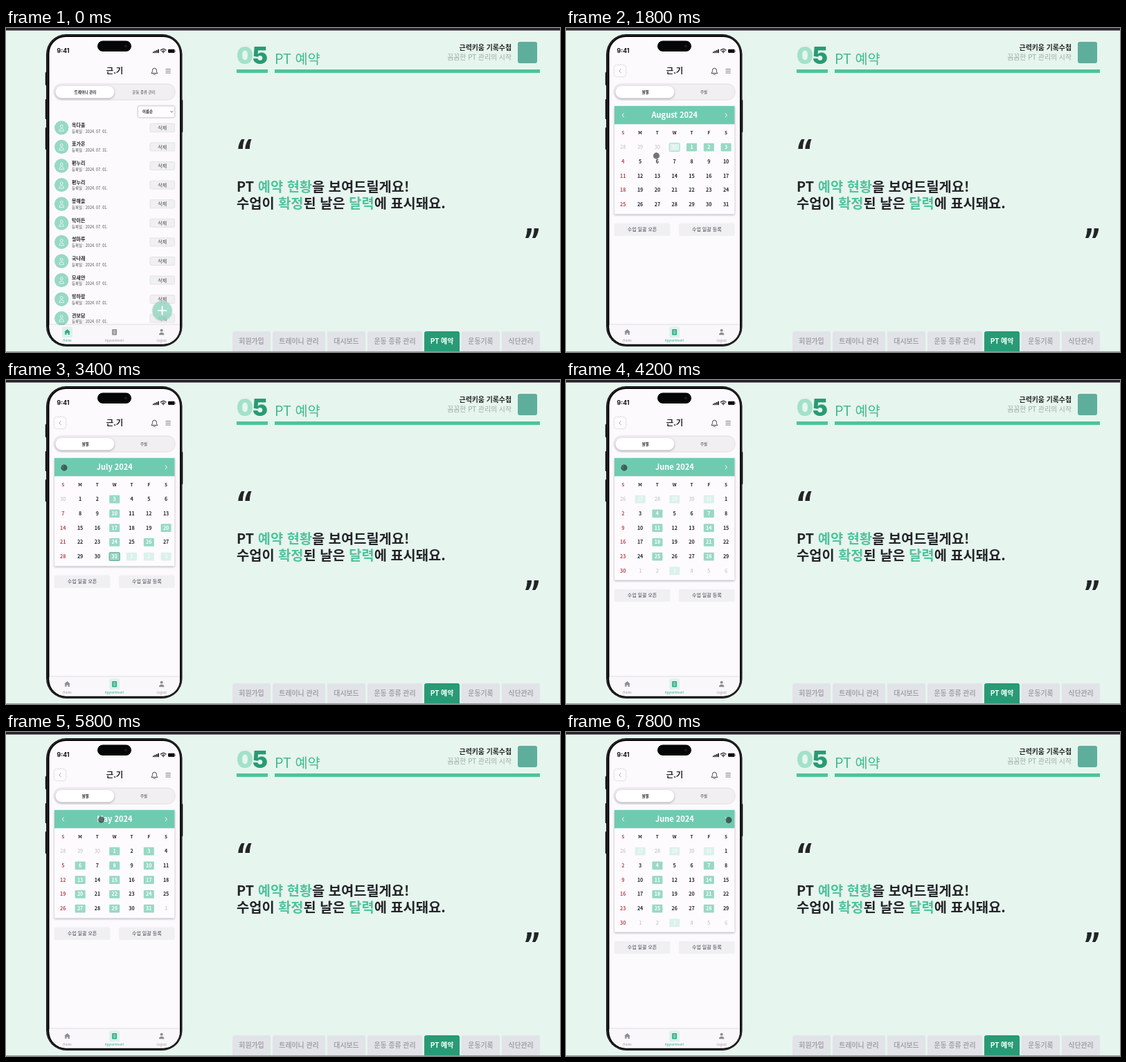
An HTML page for the animation above (8 s loop, 800 by 469 pixels).

```html
<!DOCTYPE html>
<html lang="ko">
<head>
<meta charset="utf-8">
<title>PT 예약</title>
<style>
  html, body { margin: 0; width: 100%; height: 100%; overflow: hidden; background: #e6f5ee; }
  svg { display: block; width: 100vw; height: 100vh; }
  text { font-family: "Noto Sans CJK KR", "Noto Sans CJK", "Noto Sans", sans-serif; white-space: pre; }
  .inter { font-family: Inter, sans-serif; }
  .soft { filter: drop-shadow(0 .5px 1px rgba(40, 40, 50, .3)); }
  .lift { filter: drop-shadow(0 1.5px 1.5px rgba(40, 40, 50, .38)); }
</style>
</head>
<body>
<svg id="stage" viewBox="0 0 800 469" preserveAspectRatio="none"></svg>
<script>
const LOOP = 8000, TICK = 200;
const GREEN = '#4fc39c', DEEP = '#289b75', MINT = '#98d9c4', INK = '#242428', RED = '#b8454a';
const stage = document.getElementById('stage');

function add(parent, tag, attrs = {}, content) {
  const node = document.createElementNS('http://www.w3.org/2000/svg', tag);
  for (const key in attrs) node.setAttribute(key, attrs[key]);
  if (content !== undefined) node.textContent = content;
  return parent.appendChild(node);
}
const group = (parent, attrs) => add(parent, 'g', attrs);
const box = (p, x, y, width, height, fill, rx = 0, more) =>
  add(p, 'rect', { x, y, width, height, fill, rx, ...more });
const dot = (p, cx, cy, r, fill, more) => add(p, 'circle', { cx, cy, r, fill, ...more });
const line = (p, d, stroke, width, more) =>
  add(p, 'path', { d, stroke, 'stroke-width': width, fill: 'none', 'stroke-linecap': 'round', 'stroke-linejoin': 'round', ...more });
const shape = (p, d, fill, more) => add(p, 'path', { d, fill, ...more });
const label = (p, x, y, size, text, fill = INK, weight = 400, anchor = 'start', more) =>
  add(p, 'text', { x, y, 'font-size': size, fill, 'font-weight': weight, 'text-anchor': anchor, ...more }, text);
const centred = (p, x, y, size, text, fill, weight) => label(p, x, y, size, text, fill, weight, 'middle');

// Slide around the phone
function drawSlide() {
  box(stage, 0, 0, 800, 469, '#e6f5ee');
  box(stage, 0, 0, 800, 3.6, '#27242b');
  label(stage, 333, 52, 34, '0', '#a2e1ca', 900, 'start', { class: 'inter' });
  label(stage, 356, 52, 34, '5', DEEP, 900, 'start', { class: 'inter' });
  label(stage, 388, 51.6, 19.8, 'PT 예약', '#42bb8f');
  box(stage, 333, 60, 45, 5, GREEN);
  box(stage, 388, 60, 383, 5, GREEN);
  label(stage, 730, 32.3, 9.900, '근력키움 기록수첩', INK, 700, 'end');
  label(stage, 730, 46.3, 9.900, '꼼꼼한 PT 관리의 시작', '#a0a9a6', 400, 'end');
  box(stage, 739, 20, 28, 31, '#5fae9c', 3);

  const mark = 'M335.300 175C335.600 169.500 337.300 165 340.200 161H344.600C342.700 165.500 341.900 169.500 341.900 175z';
  for (const turn of ['', 'rotate(180 552.25 232.5) ']) {
    shape(stage, mark, INK, { transform: turn });
    shape(stage, mark, INK, { transform: turn + 'translate(10 0)' });
  }

  const lines = [
    [237.4, ['PT ', '예약 현황', '을 보여드릴게요!']],
    [260.7, ['수업이 ', '확정', '된 날은 ', '달력', '에 표시돼요.']],
  ];
  for (const [y, parts] of lines) {
    const row = label(stage, 333, y, 19.8, '', INK, 700);
    parts.forEach((part, i) => add(row, 'tspan', { fill: i % 2 ? GREEN : INK }, part));
  }

  const tabs = [[327, 55, '회원가입'], [385, 76, '트레이니 관리'], [464, 55, '대시보드'], [522, 79, '운동 종류 관리'],
    [604, 51, 'PT 예약'], [658, 55, '운동기록'], [716, 55, '식단관리']];
  for (const [x, w, text] of tabs) {
    const active = text === 'PT 예약';
    box(stage, x, 439, w, 34, active ? DEEP : '#e2e3e8', 3);
    centred(stage, x + w / 2, 457.300, 9.900, text, active ? '#fff' : '#a3a4ab', 700);
  }
  box(stage, 0, 468, 800, 1, '#8f9b97');
}

function drawPhone() {
  for (const [x, y, h] of [[56.8, 64, 19], [56.8, 103, 29], [56.8, 144, 32], [252.8, 104, 47]])
    box(stage, x, y, 2.5, h, '#111', 1);
  box(stage, 58, 9, 196.500, 452, '#050506', 29);
  box(stage, 59.4, 10.400, 193.700, 449.200, 'none', 27.5, { stroke: '#55555a', 'stroke-width': .7 });
  box(stage, 62.5, 13, 188.5, 444.5, '#fcfafd', 24);
  box(stage, 132, 18.5, 49, 15.5, '#050506', 7.8);
  dot(stage, 173, 26.2, 2.2, '#14192a');
  label(stage, 73.5, 36, 8.8, '9:41', '#111', 700, 'start', { class: 'inter' });
  for (let i = 0; i < 4; i++) box(stage, 212 + i * 2.4, 34.3 - i * 1.2, 1.7, 1.9 + i * 1.2, '#111', .4);
  line(stage, 'M223.600 32q3.600-3.200 7.200 0M225.200 33.900q2-1.700 4 0', '#111', 1.3);
  dot(stage, 227.2, 35.4, .9, '#111');
  box(stage, 234, 30.8, 9.600, 5.2, '#111', 1.3);
  box(stage, 244, 32.4, 1, 2, '#777', .4);

  centred(stage, 157, 66.3, 11.3, '근.기', INK, 700);
  line(stage, 'M210.300 65.300q1.200-1.200 1.200-4a2.900 3.200 0 0 1 5.800 0q0 2.800 1.200 4zM213.200 67.200q1.200 1 2.400 0', '#333', .9);
  line(stage, 'M230.800 59.600h6.600M230.800 62.300h6.600M230.800 65h6.600', '#555', .8);
  box(stage, 69.5, 81.500, 174, 22, '#f1eff2', 11, { class: 'soft' });
  box(stage, 71.5, 84, 85, 17.500, '#fff', 8.7, { class: 'lift' });
}

function drawList() {
  const list = group(stage);
  centred(list, 114.5, 95, 5.400, '트레이니 관리', INK, 700);
  centred(list, 199, 95, 5.400, '운동 종류 관리', '#444');
  box(list, 190.5, 113, 53, 16.500, '#fdfcfe', 2, { class: 'soft', stroke: '#d0cfd5', 'stroke-width': .6 });
  label(list, 197, 123.4, 5.4, '이름순', INK, 700);
  line(list, 'M237.800 120.500l1.500 1.600 1.500-1.600', '#444', .8);

  const people = ['옥다올', '표가온', '편누리', '편누리', '봉해솔', '탁이든', '설마루', '국나래', '모새얀', '빙하람', '견보담'];
  people.forEach((name, i) => {
    const row = group(list, { transform: `translate(0 ${144.4 + i * 27.58})` });
    dot(row, 80.2, 0, 10.2, MINT);
    dot(row, 80.2, -2.3, 1.9, 'none', { stroke: '#effaf6', 'stroke-width': .8 });
    line(row, 'M76.900 4.500q0-3.500 3.300-3.500t3.300 3.500z', '#effaf6', .8);
    label(row, 95, -1.5, 7, name, INK, 700);
    label(row, 95, 7.3, 5.5, `등록일 : 2024. 07. ${i === 1 ? 31 : '01'}.`, '#4a4a4f');
    box(row, 208, -6, 35.5, 12, '#f0eff1', 1.5, { stroke: '#dddce0', 'stroke-width': .7 });
    centred(row, 225.7, 2.6, 7, '삭제', '#4a4a4f');
  });
  return list;
}

function drawFab(parent) {
  dot(parent, 225.6, 409.5, 14, '#93d8c2', { class: 'soft', opacity: .85 });
  line(parent, 'M219.800 409h11.600M225.600 403.200v11.600', '#fff', 1.9);
}

// Bottom bar with one active item
function drawNav(active) {
  const nav = group(stage);
  shape(nav, 'M62.500 430H251v3.500a24 24 0 0 1-24 24H86.500a24 24 0 0 1-24-24z', '#f9f7fa',
    { style: 'filter:drop-shadow(0 -1px 1px rgba(40,40,50,.13))' });
  ['Home', 'Appointment', 'Logout'].forEach((text, i) => {
    const x = 88.5 + i * 68.1, on = i === active, tint = on ? '#2dab82' : '#8b8b91';
    if (on) box(nav, x - 7.5, 432.5, 15, 15.5, '#dcf2ea', 2);
    if (i === 0) shape(nav, `M${x - 4.3} 440l4.300-4 4.300 4h-1v4h-2.200v-2.600h-2.200v2.600h-2.200v-4z`, tint);
    if (i === 1) {
      box(nav, x - 3.5, 436, 7, 8.400, tint, 1);
      line(nav, `M${x - 1.700} 438.200h3.400M${x - 1.700} 440.200h3.400M${x - 1.700} 442.200h3.400`, '#fff', .7);
    }
    if (i === 2) {
      dot(nav, x, 437.800, 2, tint);
      shape(nav, `M${x - 3.8} 444.200q0-3.500 3.800-3.500t3.800 3.500z`, tint);
    }
    centred(nav, x, 453.6, 4.400, text, on ? '#2dab82' : '#96969c');
  });
  return nav;
}

const schedule = {
  4: [1, 3, 6, 8, 10, 13, 15, 17, 20, 22, 24, 27, 29, 31],
  5: [4, 7, 11, 14, 18, 21, 25, 28],
  6: [3, 10, 17, 20, 24, 26, 31],
  7: [1, 2, 3],
};

function drawMonth(month, title) {
  const cal = group(stage);
  const lead = new Date(2024, month, 1).getDay();
  const weeks = Math.ceil((lead + new Date(2024, month + 1, 0).getDate()) / 7);
  const extra = (weeks - 5) * 20.3;
  const columnX = i => 82.3 + i * 24.8;

  box(cal, 70, 113, 173.5, 156.5 + extra, '#fdfbfe', 1, { class: 'lift' });
  box(cal, 70, 113, 173.5, 26.3, '#6fcbb0');
  centred(cal, 156.8, 129.7, 11, title + ' 2024', '#fff', 700);
  line(cal, 'M83.300 123.800l-2 2.500 2 2.500M230.300 123.800l2 2.500-2 2.500', '#fff', 1);
  [...'SMTWTFS'].forEach((day, i) => centred(cal, columnX(i), 154.2, 6.5, day, i ? INK : RED, 700));

  for (let i = 0; i < weeks * 7; i++) {
    const date = new Date(2024, month, i - lead + 1);
    const own = date.getMonth() === month, day = date.getDate();
    const booked = (schedule[date.getMonth()] || []).includes(day);
    const today = date.getMonth() === 6 && day === 31;
    const x = columnX(i % 7), y = 172.600 + Math.floor(i / 7) * 20.75;
    if (booked) box(cal, x - 7.5, y - 5.8, 15, 11.6, own ? MINT : '#dbf2ea', 1,
      today ? { stroke: own ? '#5f9f8b' : '#9edbc7', 'stroke-width': 1 } : {});
    const tint = booked ? '#fff' : !own ? '#b9b8bd' : i % 7 ? INK : RED;
    centred(cal, x, y + 2.6, 7.1, day, tint, own ? 700 : 400);
  }

  for (const [x, text] of [[69.7, '수업 일괄 오픈'], [163, '수업 일괄 등록']]) {
    box(cal, x, 282.500 + extra, 80.7, 18.5, '#f0eff2', 2);
    centred(cal, x + 40.3, 294 + extra, 7, text, '#444449');
  }
  return cal;
}

function drawCalendarFrame() {
  const frame = group(stage);
  box(frame, 70, 54, 16, 16, '#fdfcfe', 3.5, { class: 'soft' });
  line(frame, 'M79 59.700l-2.200 2.400 2.200 2.400', '#888', .8);
  centred(frame, 114.5, 95, 5.500, '월별', INK, 700);
  centred(frame, 199, 95, 5.500, '주별', '#444');
  return frame;
}

drawSlide();
drawPhone();
const list = drawList();
drawFab(list);
const frame = drawCalendarFrame();
const months = {
  may: drawMonth(4, 'May'), june: drawMonth(5, 'June'),
  july: drawMonth(6, 'July'), august: drawMonth(7, 'August'),
};
const homeNav = drawNav(0), bookingNav = drawNav(1);
const cursor = dot(stage, 0, 0, 4.4, 'rgba(25,25,30,.6)', { stroke: 'rgba(25,25,30,.25)', 'stroke-width': .7 });

const screens = [[0, 'list'], [400, 'august'], [2600, 'july'], [3800, 'june'], [4400, 'may'], [7200, 'june']];
const path = [[200, 151.5, 447], [1200, 151.5, 447], [1800, 130.5, 185], [2200, 84, 127],
  [5400, 84, 127], [6400, 236, 127], [7000, 236, 127], [7400, 235, 127.5], [8000, 235, 127.5]];

const show = (node, on) => node.setAttribute('visibility', on ? 'visible' : 'hidden');

function pointAt(time) {
  const next = Math.max(1, path.findIndex(step => step[0] > time));
  const [t0, x0, y0] = path[next - 1], [t1, x1, y1] = path[next];
  const k = Math.max(0, (time - t0) / (t1 - t0)), ease = k * k * (3 - 2 * k);
  return [x0 + (x1 - x0) * ease, y0 + (y1 - y0) * ease];
}

function render(now) {
  const time = Math.floor((now % LOOP) / TICK) * TICK;
  const screen = screens.filter(step => step[0] <= time).pop()[1];
  const home = screen === 'list';
  show(list, home);
  show(homeNav, home);
  show(frame, !home);
  show(bookingNav, !home);
  for (const name in months) show(months[name], name === screen);
  const [x, y] = pointAt(time);
  cursor.setAttribute('cx', x);
  cursor.setAttribute('cy', y);
  show(cursor, time >= path[0][0]);
}

const start = performance.now();
function loop() {
  render(performance.now() - start);
  requestAnimationFrame(loop);
}
loop();
</script>
</body>
</html>
```
